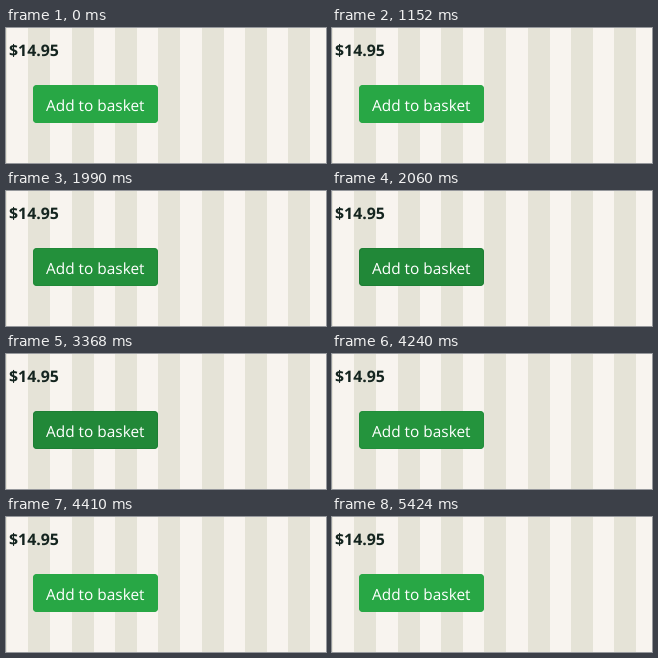
An HTML page with a canvas that plays this animation: 320x135 px, repeating every 6.1 s.

```html
<!DOCTYPE html>
<html lang="en">
<head>
<meta charset="utf-8">
<title>Add to basket</title>
<style>
  html, body { margin: 0; width: 100%; height: 100%; overflow: hidden; background: #f8f4ef; }
  canvas { display: block; width: 320px; height: 135px; }
</style>
</head>
<body>
<canvas id="stage"></canvas>
<script>
const W = 320, H = 135, LOOP = 6100;
const FONT = '"Open Sans", "Noto Sans", sans-serif';
const canvas = document.getElementById('stage');
const ctx = canvas.getContext('2d');
const dpr = window.devicePixelRatio || 1;
canvas.width = W * dpr;
canvas.height = H * dpr;
ctx.scale(dpr, dpr);
ctx.textRendering = 'geometricPrecision';

const FILL = [[40, 167, 69], [33, 136, 56]];
const EDGE = [[40, 167, 69], [30, 126, 52]];

// [start in ms, hover amount]
const HOVER = [[0, 0], [1920, 0.1], [1990, 0.75], [2060, 1], [4240, 0.6], [4340, 0.05], [4410, 0]];

function hoverAt(t) {
  let amount = 0;
  for (const [start, value] of HOVER) if (t >= start) amount = value;
  return amount;
}

function mix([a, b], k) {
  return `rgb(${a.map((v, i) => Math.round(v + (b[i] - v) * k)).join(',')})`;
}

function label(text, x, y, font, color) {
  ctx.font = `${font} ${FONT}`;
  ctx.fillStyle = color;
  ctx.fillText(text, x, y);
}

function drawStripes() {
  const period = 130 / 3, band = 22;
  ctx.fillStyle = '#f8f4ef';
  ctx.fillRect(0, 0, W, H);
  ctx.fillStyle = '#e5e3d7';
  for (let x = -21; x < W; x += period) ctx.fillRect(Math.round(x), 0, band, H);
}

function drawButton(x, y, w, h, k) {
  ctx.fillStyle = mix(FILL, k);
  ctx.beginPath();
  ctx.roundRect(x, y, w, h, 4);
  ctx.fill();
  ctx.strokeStyle = mix(EDGE, k);
  ctx.beginPath();
  ctx.roundRect(x + 0.5, y + 0.5, w - 1, h - 1, 3.5);
  ctx.stroke();
  label('Add to basket', x + 13, y + 26, '15.4px', '#fff');
}

function draw(t) {
  drawStripes();
  label('$14.95', 3, 28, 'bold 15.9px', '#14241f');
  drawButton(27, 57, 125, 38, hoverAt(t));
}

function tick() {
  draw(performance.now() % LOOP);
  requestAnimationFrame(tick);
}
tick();
</script>
</body>
</html>
```
